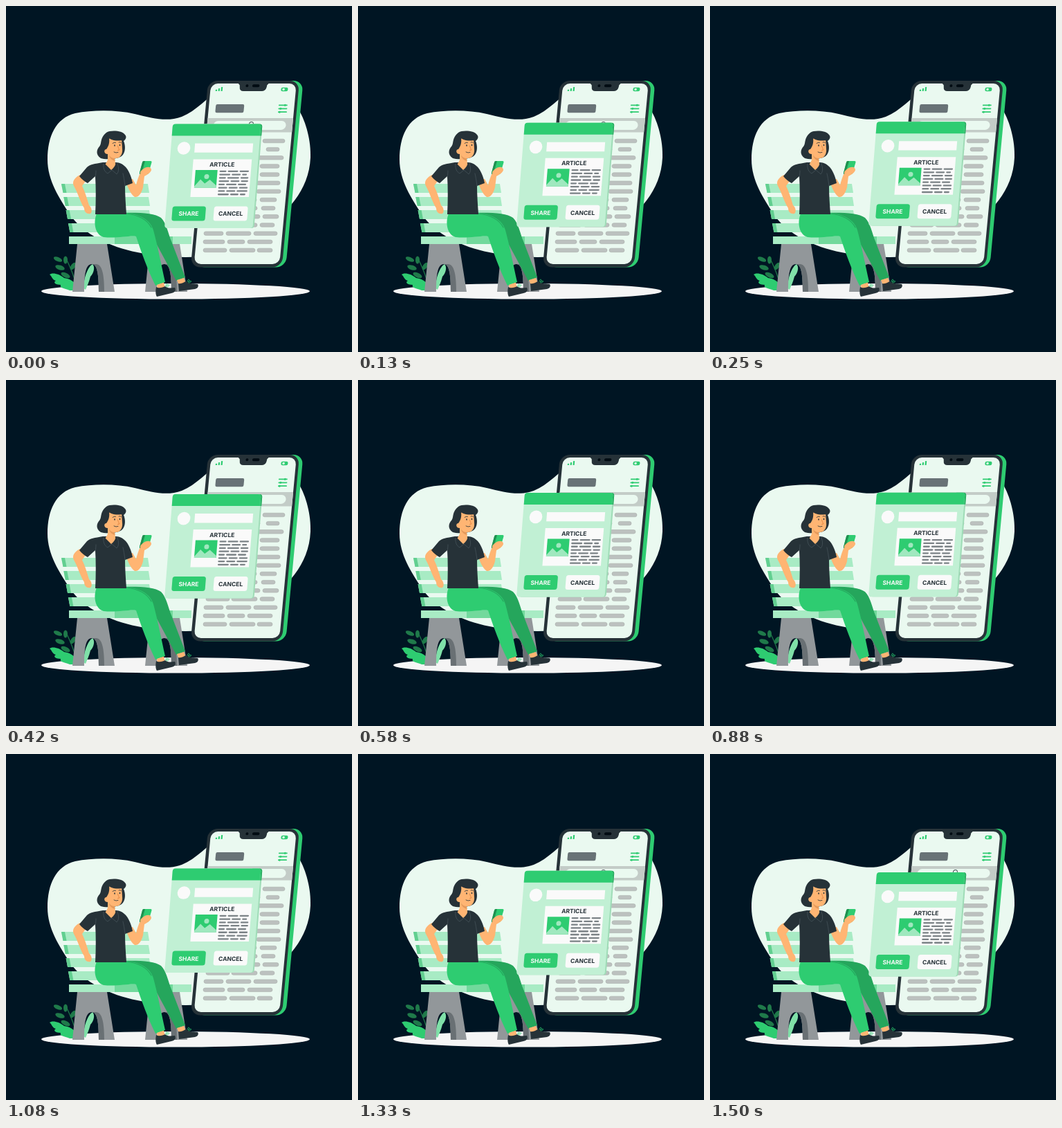
Write an HTML page that moves like this. It is 500x500 px and loops after 1.54 s.

```html
<!DOCTYPE html>
<html lang="en">
<head>
<meta charset="utf-8">
<title>Sharing an article</title>
<style>
  html, body { margin: 0; width: 100%; height: 100%; overflow: hidden; background: #001523; }
  svg { display: block; width: 100%; height: 100%; }
  text { font: 700 8.5px Inter, "Open Sans", sans-serif; text-anchor: middle; }
  .green { fill: #2ecc71; }
  .dark { fill: #263238; }
  .skin { fill: #ffb573; }
  .pale { fill: #eaf9f0; }
  .mint { fill: #a8ebc4; }
  .white { fill: #fafafa; }
  .line { fill: none; stroke-linecap: round; stroke-linejoin: round; }
</style>
</head>
<body>
<svg viewBox="0 0 500 500">
  <rect width="500" height="500" fill="#001523"/>

  <path class="pale" d="M60 222C60 188 72 162 100 155C126 150 160 150 186 156C212 162 232 168 254 160C276 151 288 134 310 120C345 101 402 117 423 150C434 168 441 196 440 219C439 243 430 264 417 281C390 316 345 352 300 360C262 366 220 362 190 356C150 348 112 330 93 302C77 278 60 252 60 222Z"/>
  <ellipse cx="245" cy="412.3" rx="194" ry="11.3" fill="#f5f5f5"/>

  <g id="plant">
    <path class="line" stroke="#1f7a4a" stroke-width="1.2" d="M102 410C100 392 92 376 86 363"/>
    <g fill="#1f7a4a">
      <ellipse cx="86" cy="367" rx="3" ry="5.5"/>
      <ellipse cx="75" cy="366" rx="6.5" ry="3" transform="rotate(22 75 366)"/>
      <ellipse cx="78" cy="378" rx="7" ry="3.3" transform="rotate(18 78 378)"/>
      <ellipse cx="97" cy="376" rx="6" ry="3.2" transform="rotate(-55 97 376)"/>
      <ellipse cx="86" cy="389" rx="7" ry="3.2" transform="rotate(25 86 389)"/>
    </g>
    <path class="green" d="M108 411C102 401 94 394 84 393C76 386 66 385 63 388C67 391 66 395 72 397C67 400 73 403 79 403C77 408 86 408 92 411Z"/>
    <path fill="#7fe0a8" d="M112 408C112 394 118 377 125 373C129 377 127 386 122 391C120 399 117 405 115 410Z"/>
  </g>

  <g id="bench">
    <g id="slats"></g>
    <g id="legs"></g>
    <rect class="mint" x="91" y="333" width="177" height="11"/>
    <path fill="#72d99c" d="M157 333H241V344H157Z"/>
  </g>

  <g id="phone" transform="translate(22.75) skewX(-5.37)">
    <rect class="green" x="286" y="108" width="131" height="269.5" rx="14"/>
    <rect class="dark" x="279.5" y="108" width="132" height="269.5" rx="14"/>
    <rect class="pale" x="284" y="112" width="123.5" height="261" rx="10"/>
    <path class="dark" d="M324 111H367V113Q365 113 365 117Q364 123 358 123H332Q326 123 326 117Q326 113 324 113Z"/>
    <circle cx="336.5" cy="115.3" r="2" fill="#000b12"/>
    <rect x="344" y="113.2" width="10.5" height="4" rx="2" fill="#000b12"/>
    <g class="green">
      <rect x="291.5" y="120.8" width="2.2" height="2.3" rx=".6"/>
      <rect x="295.4" y="119" width="2.2" height="4.1" rx=".6"/>
      <rect x="299.3" y="117" width="2.2" height="6.1" rx=".6"/>
      <rect x="386" y="117.7" width="10" height="5.6" rx="2.2"/>
      <rect x="384.6" y="142.4" width="13" height="1.8" rx=".9"/>
      <rect x="384.6" y="147.4" width="13" height="1.8" rx=".9"/>
      <rect x="384.6" y="152.3" width="13" height="1.8" rx=".9"/>
      <circle cx="394" cy="143.3" r="1.5"/>
      <circle cx="388" cy="148.3" r="1.5"/>
      <circle cx="387" cy="153.2" r="1.5"/>
    </g>
    <rect x="388" y="119" width="3.3" height="3" rx="1" class="pale"/>
    <rect x="294" y="142" width="41" height="12.3" rx="2.2" fill="#687276"/>
    <rect x="284" y="162" width="123.5" height="20.5" fill="#c3ccc7"/>
    <rect class="pale" x="293" y="166" width="105" height="13" rx="6.5"/>
    <circle class="line" cx="347.7" cy="170.6" r="3" stroke="#4d585d"/>
  </g>
  <g id="rows" fill="#bcc1bf" stroke="#a9afac" stroke-width=".6"></g>

  <g id="woman">
    <path fill="#25a65c" d="M165 299C190 298 215 299 224 306C232 314 234 328 239 340L259 392L246 397L210 330Z"/>
    <path class="skin" d="M247 396L257 393L260 401L250 403Z"/>
    <path class="dark" d="M249 401C254 402 257 399 260 398C266 402 272 401 277 402C279 405 277 408 273 409L250 412Z"/>
    <path class="green" d="M131 300C126 312 128 330 141 334C158 336 176 332 188 333C196 357 205 382 216 404L230 399C224 372 219 346 213 324C209 311 198 302 174 299Z"/>
    <path class="line" stroke="#25a65c" stroke-width="1.2" d="M174 300C192 302 204 309 210 320"/>
    <path class="skin" d="M218 403L228 399.5L230 408L219 410Z"/>
    <path class="dark" d="M217 406C222 409 227 406 230 405C235 409 240 407 244 407C246 411 244 414 239 415L218 420C216 417 216 411 217 406Z"/>
    <path class="line" stroke="#2ecc71" stroke-width=".8" d="M230 404C232 400 235 402 231 405C237 400 238 405 232 406M262 398C263 393 267 395 263 399C268 395 270 399 264 400"/>

    <path class="skin" d="M107 244C99 248 95 254 98 260C104 270 107 283 113 292C113 298 117 301 122 300C125 298 124 291 120 288C117 278 114 268 110 260L118 249Z"/>
    <path class="skin" d="M172 251C176 262 180 272 186 276C192 277 196 270 198 262L200 246C204 244 209 241 210 237C210 233 205 233 201 235L194 241C191 248 189 254 188 259L183 250Z"/>
    <path class="green" d="M199 224H209Q211 224 210.5 226L206 241Q205.400 243 203.500 243H194Q192.500 243 193 241L197 226Q197.500 224 199 224Z"/>
    <path fill="#1f8f50" d="M199 224H201L195.500 243H194Q192.500 243 193 241L197 226Q197.500 224 199 224Z"/>
    <path class="skin" d="M194 240C198 234 205 231 209 234C211 238 206 243 200 245L194 246Z"/>
    <path class="dark" d="M140 226C128 228 121 229 117 233L106 246C109 250 114 254 118 256L129 246C130 263 130 282 129 301H174C173 287 172 273 172 260L183 256C181 246 177 236 171 231C167 227 162 226 158 226Z"/>
    <path class="line" stroke="#46535a" stroke-width=".8" d="M129 247C130 243 130 240 130 238M172 260C171 252 170 246 169 242M141 228C140 235 143 240 147 242L153 237L160 243C164 239 163 231 160 227"/>
    <path class="dark" d="M145 183C151 179 168 180 172 186C175 189 173 193 170 195C173 202 173 212 167 217C160 222 143 222 137 220C129 215 131 207 135 203C139 199 135 191 145 183Z"/>
    <path class="skin" d="M145 207C141 207 141 214 147 214L147 222C146 226 143 228 144 229L152 237C156 234 159 229 158 227L157 220C165 221 169 214 168 206L167 192C160 194 153 193 149 191C150 198 148 203 145 207Z"/>
    <path fill="#e59a5b" d="M149 216C152 219 154 220 157 220L157.500 224C153 223 150 220 149 216Z"/>
    <path class="dark" d="M145 188C151 195 163 196 171 193L170 186L158 181Z"/>
    <ellipse class="dark" cx="157" cy="201.500" rx=".8" ry="1.200"/>
    <ellipse class="dark" cx="164.500" cy="201" rx=".8" ry="1.200"/>
    <path class="line" stroke="#263238" stroke-width=".8" d="M154 198.500Q156 196.500 158.500 197.500M163 197Q165 196 166.500 197.500M156 211Q159 213 162 211.500"/>
    <path class="line" stroke="#e0843f" stroke-width=".9" d="M161.500 202C162 205 163.500 207 164 208L161.500 208.500"/>
  </g>

  <g id="panel">
    <g transform="translate(19.7) skewX(-4.57)">
      <rect x="238" y="171" width="126.500" height="150.500" rx="4" fill="#9fdcb7"/>
      <path fill="#27ae60" d="M350 171H360.500Q364.500 171 364.500 175V188H350Z"/>
      <rect x="235" y="171" width="127.500" height="150.500" rx="4" fill="#c1f0d4"/>
      <path class="green" d="M235 188V175Q235 171 239 171H358.500Q362.500 171 362.500 175V188Z"/>
      <circle class="white" cx="253.800" cy="206" r="9.300"/>
      <rect class="white" x="269.400" y="199" width="84" height="13.300"/>
      <rect class="white" x="268.800" y="222" width="84.500" height="54.500"/>
      <text class="dark" x="310.900" y="232.600">ARTICLE</text>
      <rect class="green" x="273.200" y="237.500" width="31.800" height="25.500"/>
      <g fill="#a0e8bf">
        <circle cx="290" cy="247" r="3.500"/>
        <path d="M273.200 261L281.500 251L288 257L295 251.500L305 260V263H273.200Z"/>
      </g>
      <g id="copy" fill="#7b8286"></g>
      <rect class="green" x="244.300" y="290" width="48.300" height="21" rx="3.500"/>
      <rect class="white" x="304.500" y="290" width="48.800" height="21" rx="3.500"/>
      <text class="white" x="268.400" y="304">SHARE</text>
      <text class="dark" x="329" y="304">CANCEL</text>
    </g>
  </g>
</svg>
<script>
  const $ = id => document.getElementById(id);

  function add(parent, tag, attrs) {
    const el = document.createElementNS("http://www.w3.org/2000/svg", tag);
    for (const key in attrs) el.setAttribute(key, attrs[key]);
    $(parent).append(el);
  }

  const bar = (parent, x1, x2, y, height) =>
    add(parent, "rect", { x: x1, y: y - height / 2, width: x2 - x1, height, rx: height / 2 });

  // Backrest: four slats, each a little further right
  for (let i = 0; i < 4; i++) {
    const x = 80 + i * 3.3, y = 257 + i * 19;
    add("slats", "path", { d: `M${x} ${y}H${205 + i}L${207 + i} ${y + 13}H${x + 2.5}Z`, class: "mint" });
    add("slats", "path", { d: `M${x} ${y}h5l2.500 13h-5Z`, fill: "#62cf90" });
  }

  // Supports with an arched opening
  for (const x of [96, 201]) {
    add("legs", "path", {
      d: `M${x} 413L${x + 7} 344H${x + 50}L${x + 61} 413H${x + 38}C${x + 38} 388 ${x + 36} 373 ${x + 28} 373C${x + 19} 373 ${x + 17} 388 ${x + 17} 413Z`,
      fill: "#92979a"
    });
    add("legs", "path", {
      d: `M${x + 28} 373C${x + 36} 373 ${x + 38} 388 ${x + 38} 413H${x + 46}C${x + 46} 388 ${x + 43} 373 ${x + 34} 373Z`,
      fill: "#697074"
    });
  }

  // Lines on the phone: start and end pairs, top to bottom
  const rows = [
    [371, 403], [340, 367, 376, 395], [345, 401], [367, 395], [367, 395],
    [340, 396], [362, 397], [340, 362, 367, 391], [330, 363, 369, 389],
    [330, 367, 371, 394], [289, 323, 326, 363, 367, 388],
    [286, 314, 318, 354, 358, 392], [285, 316, 320, 345, 349, 385],
    [285, 319, 323, 360, 363, 385]
  ];
  rows.forEach((row, i) => {
    for (let j = 0; j < row.length; j += 2) bar("rows", row[j], row[j + 1], 195 + i * 12.15, 5.5);
  });

  // Article copy: two gaps per line
  const gaps = [[318, 335], [324, 339], [318, 337], [323, 338], [317, 334], [321, 336], [318, 333], [324, 338]];
  gaps.forEach(([a, b], i) => {
    const y = 239.3 + i * 4.78;
    bar("copy", 308, a, y, 2.3);
    bar("copy", a + 2, b, y, 2.3);
    bar("copy", b + 2, i % 3 == 1 ? 348 : 350.5, y, 2.3);
  });

  // The panel floats up and down at constant speed, in 37 held steps
  const LOOP = 1540, STEPS = 37, RISE = 10;
  const start = performance.now();

  function draw(now) {
    const time = Math.max(0, now - start) % LOOP;
    const held = Math.floor(time / LOOP * STEPS + 0.1) / STEPS;
    const phase = (held + 40 / LOOP) % 1;
    const lift = RISE * (1 - Math.abs(2 * phase - 1));
    $("panel").setAttribute("transform", `translate(0 ${-lift})`);
    requestAnimationFrame(draw);
  }
  draw(start);
</script>
</body>
</html>
```
